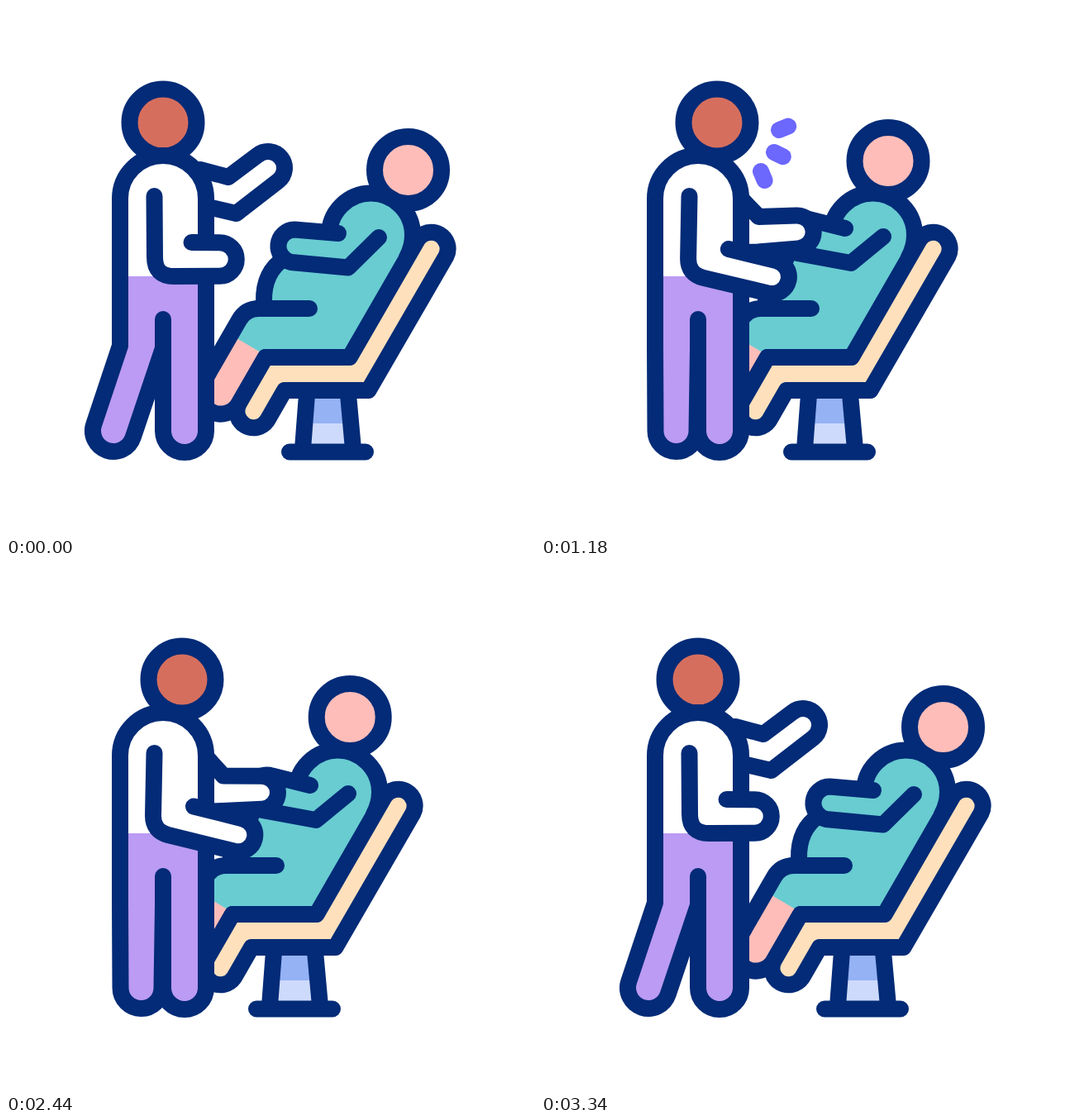
Write an HTML page that moves like this. It is 640 by 640 pixels and loops after 3.6 s.

```html
<!DOCTYPE html>
<html lang="en">
<head>
<meta charset="utf-8">
<title>Check-up</title>
<style>
  html, body { margin: 0; width: 100%; height: 100%; overflow: hidden; background: #fff; }
  svg { display: block; width: 100vw; height: 100vh; }
  .line { stroke: #032b77; stroke-width: 20; stroke-linecap: round; stroke-linejoin: round; fill: none; }
  .teal { fill: #68ccd1; }
  .white { fill: #fff; }
  .purple { fill: #bb9bf3; }
  .pink { fill: #ffbdb9; }
  .cream { fill: #ffe0bc; }
  .brown { fill: #d66e5e; }
  #rays { stroke: #6c67fd; stroke-linecap: round; }
</style>
</head>
<body>
<svg viewBox="0 0 640 640">
  <g id="patient">
    <path fill="#94b2f4" d="M364 470H414L417 505H361Z"/>
    <path fill="#cedafc" d="M361 505H417L420 538H358Z"/>
    <path class="line" d="M364 470L359 536M414 470L420 536M343 539.5H435"/>
    <circle id="patientHead" class="line pink" r="40.5"/>
    <path class="pink" d="M271 396L238.200 456A25 25 0 0 0 281.700 481L314.700 423Z"/>
    <path class="teal" d="M391 277A50.500 50.500 0 0 1 492 277Q492 291 485 304L416 425H318L270 396.500L282 379Q290 366 306 366H312Q311 322 337 305Z"/>
    <path class="line" d="M391 277A50.500 50.500 0 0 1 492 277Q492 291 485 304"/>
    <path class="line" d="M337 305Q311 322 312 358"/>
    <path class="line" d="M367 366H306Q290 366 282 380L238.200 456A25 25 0 0 0 281.700 481L314 425"/>
    <path id="patientArm" class="line teal"/>
    <path class="line cream" d="M281.700 481L314 425H415.700L497.700 283A20 20 0 0 1 532.300 303L438.500 465H337L316.300 501A20 20 0 0 1 281.700 481Z"/>
  </g>
  <path id="farArm" class="line white"/>
  <circle id="doctorHead" class="line brown" cy="141" r="40.5"/>
  <path id="body" class="purple"/>
  <path class="white" d="M138 327V233A52 52 0 0 1 242 233V327Z"/>
  <path id="bodyLine" class="line"/>
  <path id="nearArm" class="line white"/>
  <g id="rays"><line/><line/><line/></g>
</svg>
<script>
const LOOP = 3600;
const $ = id => document.getElementById(id);
const rays = [...document.querySelectorAll('#rays line')];
const RAYS = [[288, 150, .93, -.37], [282, 177, .9, .43], [266, 200, .38, .92]];

const clamp = x => Math.min(1, Math.max(0, x));
const mix = (a, b, k) => a + (b - a) * k;
const pt = (x, y) => x.toFixed(2) + ' ' + y.toFixed(2);
const mixPt = (ax, ay, bx, by, k) => pt(mix(ax, bx, k), mix(ay, by, k));
const ease = (t, from, to) => {
  const x = clamp((t - from) / (to - from)), y = 1 - x;
  return x * x / (x * x + y * y);
};

// Rounded limb end: two points at distance r on both sides of (x, y).
function cap(x, y, angle, r) {
  const nx = Math.sin(angle) * r, ny = -Math.cos(angle) * r;
  return { a: pt(x + nx, y + ny), b: pt(x - nx, y - ny) };
}

function drawPatient(k, t) {
  $('patient').setAttribute('transform', `translate(${-40 * k} 0)`);
  const x = mix(486.5, 460, k) - 440, y = mix(198.5, 187.5, k) - 250;
  const nod = t > 1920 && t < 3306
    ? -.061 * (1 - Math.cos((t - 1920) / 693 * 2 * Math.PI)) : 0;
  const c = Math.cos(nod), s = Math.sin(nod);
  $('patientHead').setAttribute('cx', 440 + x * c - y * s);
  $('patientHead').setAttribute('cy', 250 + x * s + y * c);
  $('patientArm').setAttribute('d',
    `M${mixPt(402, 275, 408, 269, k)}L${mixPt(349, 270.5, 362, 257.5, k)}` +
    `A20 20 0 0 0 ${mixPt(345, 310, 350, 299, k)}` +
    `L${mixPt(414, 316.5, 415, 311, k)}L${mixPt(451, 280, 454, 279, k)}`);
}

function drawBody(k) {
  $('doctorHead').setAttribute('cx', mix(190, 213, k));
  const fx = mix(130, 163.5, k);
  const foot = cap(fx, 514, Math.atan2(103, fx - 164.5), 25);
  const d = 'M190 379V514A26 26 0 0 0 242 514V233A52 52 0 0 0 138 233V411' +
    `L${foot.b}A25 25 0 0 0 ${foot.a}L190 414`;
  $('body').setAttribute('d', d);
  $('bodyLine').setAttribute('d', d);
}

function drawArms(k) {
  const far = mix(-.666, -.026, k), len = mix(53.4, 51, k);
  const hx = mix(275, 258, k) + len * Math.cos(far);
  const hy = mix(229, 279, k) + len * Math.sin(far);
  const h = cap(hx, hy, far, 20);
  $('farArm').setAttribute('d',
    `M${mixPt(235, 198, 244, 236.5, k)}L${mixPt(269, 207, 263, 257.5, k)}` +
    `L${h.a}A20 20 0 0 1 ${h.b}` +
    `L${mixPt(278.5, 251, 262, 300, k)}L${mixPt(235.6, 241, 240, 301, k)}`);

  const n = cap(mix(258.5, 281, k), mix(306.5, 329, k), mix(0, .23, k), 20.3);
  $('nearArm').setAttribute('d',
    `M179.500 230L${mixPt(180, 304, 178, 306, k)}` +
    `Q${mixPt(180, 327, 178, 324, k)} ${mixPt(203, 327, 196, 329, k)}` +
    `L${n.b}A20.300 20.300 0 0 0 ${n.a}L${mixPt(224.5, 286, 227, 294.5, k)}`);
}

// Speech rays grow, then fly outwards and vanish.
function drawRays(t) {
  const c = (t - 500) % 520;
  const on = t >= 500 && t < 2580 && c < 370;
  $('rays').setAttribute('visibility', on ? 'visible' : 'hidden');
  if (!on) return;
  const g = clamp(c / 140), out = clamp((c - 170) / 200);
  const end = 12 * (1 - (1 - g) ** 2) + 18 * Math.sqrt(out);
  const start = Math.min(end - .1, 30 * out);
  $('rays').setAttribute('stroke-width', 20 * clamp((1 - out) / .3));
  RAYS.forEach(([x, y, dx, dy], i) => {
    const r = rays[i];
    r.setAttribute('x1', x + dx * start);
    r.setAttribute('y1', y + dy * start);
    r.setAttribute('x2', x + dx * end);
    r.setAttribute('y2', y + dy * end);
  });
}

function draw(now) {
  const t = now % LOOP;
  const k = ease(t, 0, 460) - ease(t, 2872, 3340);
  const lift = .6 * (ease(t, 570, 910) - ease(t, 920, 1260));
  drawPatient(k, t);
  drawBody(k);
  drawArms(k - lift);
  drawRays(t);
}

const t0 = performance.now();
function tick() {
  draw(performance.now() - t0);
  requestAnimationFrame(tick);
}
tick();
</script>
</body>
</html>
```
